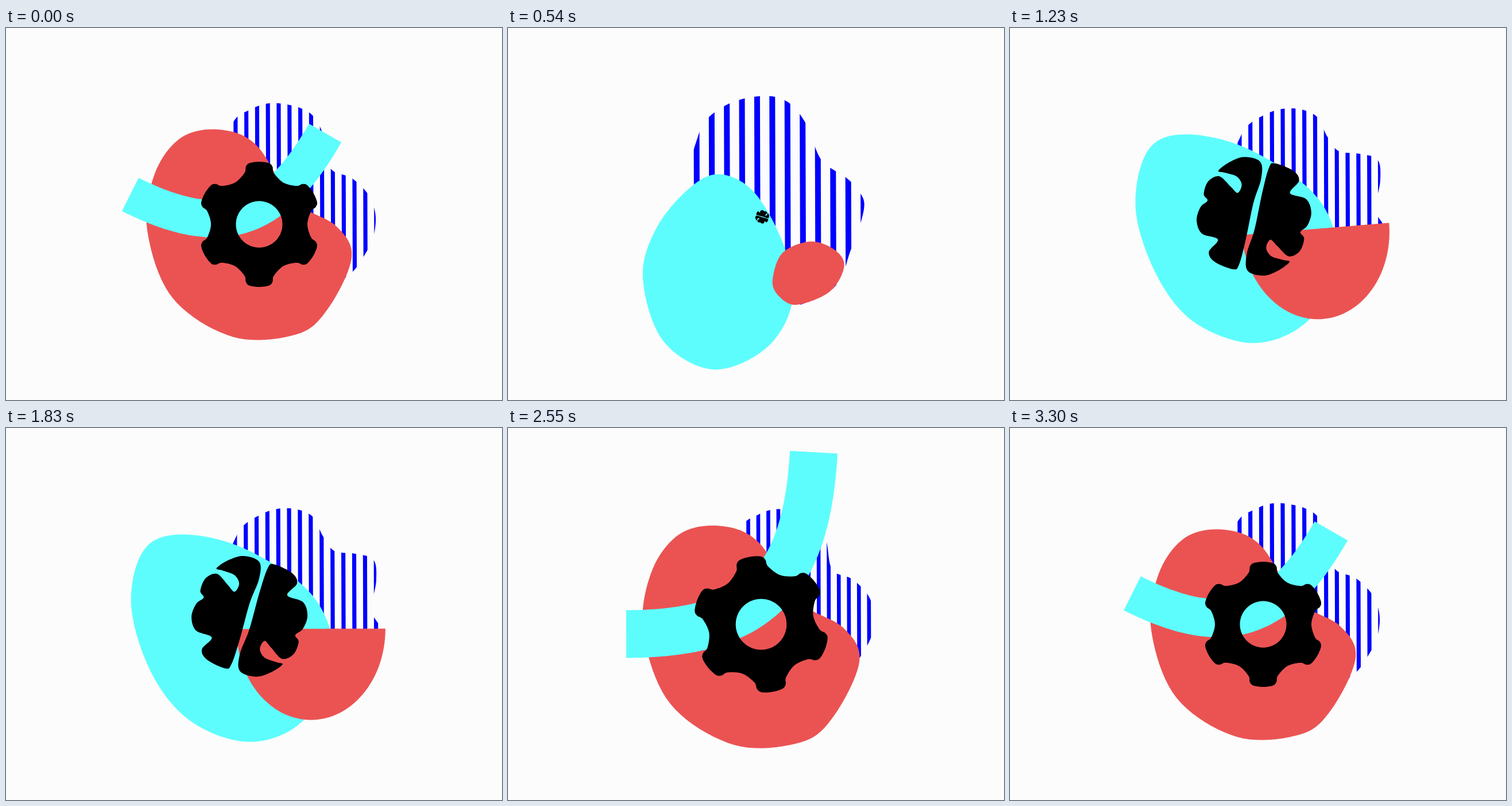
Animation of 864 by 648 pixels, one loop 3330 ms. Source, as an HTML page:

```html
<!DOCTYPE html>
<html lang="en">
<head>
<meta charset="utf-8">
<title>Gear and brain</title>
<style>
html, body { margin: 0; width: 100%; height: 100%; overflow: hidden; background: #fcfcfc; }
svg { display: block; width: 100vw; height: 100vh; }
</style>
</head>
<body>
<svg viewBox="0 0 864 648">
  <clipPath id="clip"><path id="cloud"/></clipPath>
  <g clip-path="url(#clip)"><path id="stripes" fill="#00f"/></g>
  <path id="big"/>
  <path id="small"/>
  <path id="icon" fill-rule="evenodd"/>
</svg>
<script>
const LOOP = 3330, N = 120;
const RED = '#eb5353', CYAN = '#5efdfd';
const $ = id => document.getElementById(id);
const range = n => [...Array(n).keys()];
const polar = (deg, r) => [r * Math.cos(deg * Math.PI / 180), r * Math.sin(deg * Math.PI / 180)];

// ---- shapes: flat lists of N outline points, so that any two can be mixed ----
const mix = (a, b, k) => a.map((v, i) => v + (b[i] - v) * k);
const path = list => 'M' + list.map(v => v.toFixed(2)).join(' ') + 'Z';

function turn(list, cx, cy, scale, deg = 0, dx = 0, dy = 0) {
  const [c, s] = polar(deg, scale), out = [];
  for (let i = 0; i < list.length; i += 2) {
    const x = list[i] - cx, y = list[i + 1] - cy;
    out.push(cx + dx + x * c - y * s, cy + dy + x * s + y * c);
  }
  return out;
}

// Closed smooth curve through a few key points.
function blob(keys, count = N) {
  const n = keys.length;
  return range(count).flatMap(i => {
    const u = i * n / 2 / count, k = Math.floor(u), f = u - k;
    return [0, 1].map(axis => {
      const [a, b, c, d] = [-1, 0, 1, 2].map(o => keys[(2 * (k + o) + axis + n) % n]);
      return b + f / 2 * (c - a + f * (2 * a - 5 * b + 4 * c - d + f * (3 * b - a - 3 * c + d)));
    });
  });
}

// Two edges joined at sharp corners: the first runs forwards, the second back.
function twoEdges(first, second) {
  const half = N / 2, u = i => i / (half - 1);
  return [...range(half).flatMap(i => first(u(i))), ...range(half).flatMap(i => second(1 - u(i)))];
}

// Bent strip from a to b, pulled towards q.
function band(a, q, b, width) {
  const c = mix(a, q, .73), d = mix(b, q, .73);
  const edge = side => u => {
    const l = mix(mix(a, c, u), mix(c, d, u), u), r = mix(mix(c, d, u), mix(d, b, u), u);
    const [x, y] = mix(l, r, u), dx = r[0] - l[0], dy = r[1] - l[1];
    const k = side * width / 2 / Math.hypot(dx, dy);
    return [x + dy * k, y - dx * k];
  };
  return twoEdges(edge(1), edge(-1));
}

const halfDisc = (cx, cy, rx, ry) => twoEdges(
  u => [cx - rx + 2 * rx * u, cy],
  u => [cx - rx * Math.cos(Math.PI * u), cy + ry * Math.sin(Math.PI * u)]);

// ---- large blob ----
const bean = blob([246,352, 259,254, 305,191, 372,177, 436,204, 500,300,
  575,345, 602,400, 560,490, 505,534, 395,538, 290,470]);
const eggTall = blob([235,437, 257,352, 313,282, 368,255, 430,288, 483,387, 494,482, 447,560, 356,595, 270,545]);
const eggWide = blob([212,275, 236,206, 310,183, 417,203, 520,260, 570,362, 509,511, 432,534, 345,511, 250,423]);
const eggRest = blob([218,310, 240,212, 308,185, 420,212, 535,293, 570,400, 520,508, 428,547, 325,513, 255,430]);
const eggLean = blob([252,398, 270,326, 325,268, 435,239, 490,268, 497,350, 462,443, 370,498, 310,487, 265,447]);

// ---- ribbon and half disc ----
const ribbon = band([216.5, 290], [433, 398], [556, 183], 65);
const ribbonLow = band([215.5, 289], [425.5, 423], [583.5, 216], 69);
const disc = halfDisc(532, 350, 130, 159);
const discTilt = turn(disc, 532, 350, 1.04, 20, 61, 18);
const pebble = blob([461,438, 478,392, 526,372, 568,386, 585,415, 560,459, 502,482, 470,465]);
const peanut = blob([337,387, 352,352, 373,312, 380,279, 412,270, 447,281, 484,335, 465,395, 388,437, 347,419]);

// ---- striped cloud ----
const cloudA = blob([473,131, 528,147, 553,187, 565,244, 603,262, 634,295, 644,338,
  629,388, 580,440, 470,440, 375,320, 390,178, 428,141]);
const cloudB = blob([492,140, 533,153, 552,188, 572,214, 608,219, 640,229, 645,265,
  637,318, 650,370, 520,440, 385,290, 402,188, 446,150]);
const cloudUp = blob([438,119, 486,128, 520,168, 546,230, 588,260, 612,285, 620,315,
  598,384, 560,458, 440,480, 315,330, 332,187, 376,137]);
const cloudBig = blob([391,94, 445,105, 482,142, 508,197, 552,216, 604,267, 626,348,
  604,422, 540,505, 420,518, 275,405, 237,265, 300,138]);

// ---- icons, centred on 0,0 ----
const tooth = [[-16, 93], [-13, 103], [-9, 108], [0, 109], [9, 108], [13, 103], [16, 93], [30, 84]];
const rim = range(6).flatMap(i => tooth.flatMap(([deg, r]) => polar(deg + i * 60 - 90, r)));
const hole = range(N).flatMap(i => polar(i * 360 / N, 40.5));
const gear = path(blob(rim, 480)) + path(hole);

const lobe = turn(blob([365,244, 385,230, 412,222, 440,232, 440,262, 424,305, 407,370, 393,413,
  382,420, 350,405, 341,387, 358,366, 330,354, 322,330, 330,307, 343,296,
  337,284, 346,262, 366,254, 385,273, 397,285, 405,271, 397,256, 376,248], 360), 424, 328, 1, 0, -424, -328);
const brain = path(lobe) + path(turn(lobe, 0, 0, 1, 180));

// ---- timeline ----
const times = [0, 540, 675, 840, 1155, 1665, 2205, 2340, 2505, 2820, LOOP];
const inOut = u => (1 - Math.cos(Math.PI * u)) / 2;
const eases = [u => u ** 4, u => u, u => u * (2 - u), inOut, inOut];

const tracks = {
  big: [bean, eggTall, mix(eggTall, eggWide, .45), eggWide, mix(eggRest, eggWide, -.15), eggRest,
    mix(eggRest, eggLean, .6), eggLean, turn(bean, 424, 360, 1.06, 0, 0, 4), turn(bean, 424, 360, 1, -2.5), bean],
  small: [ribbon, pebble, mix(pebble, discTilt, .55), discTilt, turn(disc, 532, 350, .99, -5), disc,
    mix(disc, peanut, .6), peanut, turn(ribbon, 393, 290, 1.3, -28, 15, -35), ribbonLow,
    turn(ribbon, 393, 290, 1.02, 0, 0, -2)],
  cloud: [cloudA, cloudUp, turn(cloudBig, 430, 308, 1, 0, 0, -8), turn(cloudB, 695, 285, .93), cloudB, cloudB,
    mix(cloudB, cloudBig, .5), cloudBig, turn(cloudA, 560, 285, .93), turn(cloudA, 503, 285, .99), cloudA],
  // scale, left edge of the rightmost stripe
  stripes: [[1, 641], [1.404, 614], [1.385, 620], [.927, 643], [1, 641], [1, 641],
    [1.404, 614], [1.385, 620], [.927, 643], [.995, 640], [1, 641]],
  // x, y, scale, angle; a negative scale shows the brain
  icon: [[441, 342, 1, 0], [443, 329, -.11, -90], [430, 327, -.65, -35], [418, 324, -1.12, 7],
    [425, 328, -.98, -3], [424, 328, -1, 0], [440, 335, .11, 77], [440, 343, .605, 14],
    [441, 342, 1.1, -10], [441, 342, .985, 4], [441, 342, 1, 0]]
};

function stripePath([scale, right]) {
  const pitch = 18.8 * scale, w = pitch * .38;
  return range(24).map(i => `M${right - (i - 2) * pitch - .8},0h${w}l2,648h${-w}z`).join('');
}

function draw(t) {
  let i = 0;
  while (t >= times[i + 1]) i++;
  const k = eases[i % 5]((t - times[i]) / (times[i + 1] - times[i]));
  const now = name => mix(tracks[name][i], tracks[name][i + 1], k);

  for (const name of ['big', 'small', 'cloud']) $(name).setAttribute('d', path(now(name)));
  $('stripes').setAttribute('d', stripePath(now('stripes')));

  const swapped = t >= 510 && t < 2430;
  $('big').setAttribute('fill', swapped ? CYAN : RED);
  $('small').setAttribute('fill', swapped ? RED : CYAN);

  const [x, y, s, angle] = now('icon');
  $('icon').setAttribute('d', s < 0 ? brain : gear);
  $('icon').setAttribute('transform', `translate(${x},${y}) rotate(${angle}) scale(${Math.abs(s)})`);
}

const start = performance.now();
function frame() {
  draw((performance.now() - start) % LOOP);
  requestAnimationFrame(frame);
}
draw(0);
requestAnimationFrame(frame);
</script>
</body>
</html>
```
